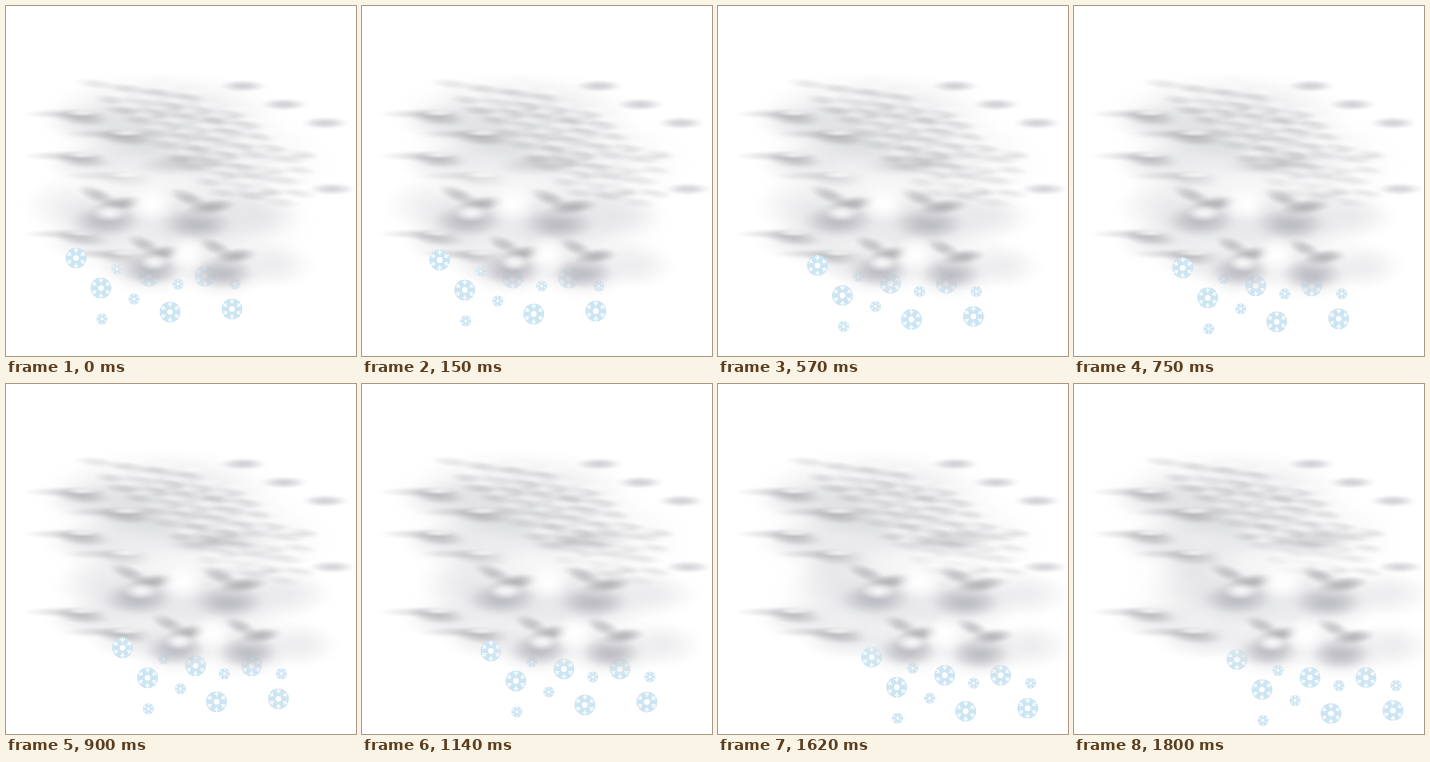
Write an HTML page with a canvas that moves like this. It is 350 px wide and 350 px high and loops after 1.83 s.

```html
<!DOCTYPE html>
<html lang="en">
<head>
<meta charset="utf-8">
<title>Snow cloud</title>
<style>
html, body { margin: 0; width: 100%; height: 100%; overflow: hidden; background: #fff; }
canvas { display: block; }
</style>
</head>
<body>
<canvas id="sky" width="350" height="350"></canvas>
<script>
const canvas = document.getElementById('sky');
const LOOP = 1830, STEP = 30;
const WHITE = '255,255,255', HAZE = '210,211,215', GREY = '148,148,153', LILAC = '165,165,175';

let seed = 7;
const rand = () => (seed = seed * 16807 % 2147483647) / 2147483647;

// Soft ellipse that fades to nothing at its rim
function blob(c, x, y, rx, ry, rgb, alpha, turn = 0) {
  c.save();
  c.translate(x, y);
  c.rotate(turn);
  c.scale(rx, ry);
  const g = c.createRadialGradient(0, 0, 0, 0, 0, 1);
  for (let d = 0; d <= 1; d += 0.125) {
    g.addColorStop(d, `rgba(${rgb},${alpha * (1 - d * d) ** 2})`);
  }
  c.fillStyle = g;
  c.fillRect(-1, -1, 2, 2);
  c.restore();
}

// Wind-drawn wisp: long tail to the left, dark belly, lit top
function wisp(c, x, y, w) {
  blob(c, x + w * 0.3, y + 8, w * 1.6, 22, HAZE, 0.4);
  blob(c, x - w * 0.5, y, w * 1.5, 6, GREY, 0.3);
  blob(c, x, y + 4, w, 9, GREY, 0.45, 0.08);
  blob(c, x, y - 1, w * 0.6, 4, WHITE, 0.65);
}

// Slanted rows of small puffs, bounded by the sloping right edge
function ripples(c) {
  for (let row = 0; row < 10; row++) {
    const end = Math.min(205 + row * 24, 300);
    for (let x = 90 + row * 14; x < end; x += 30) {
      const y = 78 + row * 12 + (x - 90 - row * 14) * 0.12 + rand() * 5;
      const w = 17 + rand() * 8;
      blob(c, x + 8, y - 6, w, 5, WHITE, 0.4);
      blob(c, x, y, w, 6, GREY, 0.15 + rand() * 0.17, 0.1);
    }
  }
}

function paintBank(c) {
  blob(c, 155, 112, 130, 50, HAZE, 0.65);
  blob(c, 185, 158, 150, 62, HAZE, 0.55);
  blob(c, 180, 215, 135, 66, HAZE, 0.55);
  ripples(c);
  for (const y of [108, 150, 228]) {
    wisp(c, 76, y, 32);
    wisp(c, 120, y + 20, 34);
  }
  for (let i = 0; i < 3; i++) blob(c, 237 + i * 41, 80 + i * 18.5, 26, 7, LILAC, 0.5);
  blob(c, 326, 183, 26, 7, LILAC, 0.45);
}

function flake(c, x, y, r) {
  c.save();
  c.translate(x, y);
  c.fillStyle = '#cce5f3';
  c.beginPath();
  c.arc(0, 0, r, 0, 7);
  c.fill();
  c.fillStyle = c.strokeStyle = '#fff';
  c.lineWidth = r * 0.1;
  for (let i = 0; i < 6; i++) {
    c.beginPath();
    c.moveTo(0, -r * 0.5);
    c.lineTo(0, -r);
    c.moveTo(-r * 0.2, -r * 0.82);
    c.lineTo(0, -r * 0.62);
    c.lineTo(r * 0.2, -r * 0.82);
    c.stroke();
    c.rotate(Math.PI / 3);
  }
  c.beginPath();
  c.arc(0, 0, r * 0.27, 0, 7);
  c.fill();
  c.restore();
}

const big = [[70, 252], [95, 282], [143, 270], [199, 270], [164, 306], [226, 303]];
const little = [[111, 263], [172, 278], [128, 293], [96, 313], [229, 278]];

// Rolling puff: pale body, dark belly, brow above; shine whitens its middle
function puff(c, x, y, w, shine) {
  blob(c, x, y - 3, w * 1.9, 33, WHITE, 0.55);
  blob(c, x, y, w * 1.7, 30, HAZE, 0.6);
  blob(c, x, y + 2, w * 1.1, 18, LILAC, 0.6);
  blob(c, x - w * 0.25, y - 24, w * 0.65, 9, GREY, 0.45, 0.35);
  blob(c, x + w * 0.4, y - 15, w * 0.8, 9, GREY, 0.6, -0.12);
  blob(c, x + w * 0.1, y - 6, w * 0.55, 10, WHITE, shine);
}

// One rank of the front cloud: a shining puff, a gap of light, a darker puff
function rank(c, left, right, y, w) {
  const mid = (left + right) / 2;
  blob(c, right + w * 1.6, y - 3, w * 1.5, 26, HAZE, 0.4);
  puff(c, left, y, w, 0.8);
  puff(c, right, y + 3, w, 0.1);
  blob(c, mid, y - 15, w * 0.75, 21, WHITE, 0.95);
}

function paintFront(c, p) {
  c.save();
  c.translate(63 * p, 0);
  blob(c, 72, 200, 62, 34, HAZE, 0.4);
  blob(c, 140, 180, 115, 30, WHITE, 0.7);
  blob(c, 177, 157, 55, 13, GREY, 0.3, -0.08);
  rank(c, 100, 191, 213, 36);
  c.restore();

  c.save();
  c.translate(50 * p, 3 * p);
  rank(c, 145, 217, 262, 31);
  c.restore();
}

const ctx = canvas.getContext('2d');
const bank = document.createElement('canvas');
bank.width = bank.height = 350;
paintBank(bank.getContext('2d'));

function draw() {
  const p = Math.floor(performance.now() % LOOP / STEP) * STEP / 1800;
  ctx.fillStyle = '#fff';
  ctx.fillRect(0, 0, 350, 350);
  ctx.drawImage(bank, 0, 0);
  for (const [list, r] of [[big, 10.5], [little, 5.5]]) {
    for (const [x, y] of list) flake(ctx, x + 93 * p, y + 23.5 * p, r);
  }
  paintFront(ctx, p);
  requestAnimationFrame(draw);
}
draw();
</script>
</body>
</html>
```
